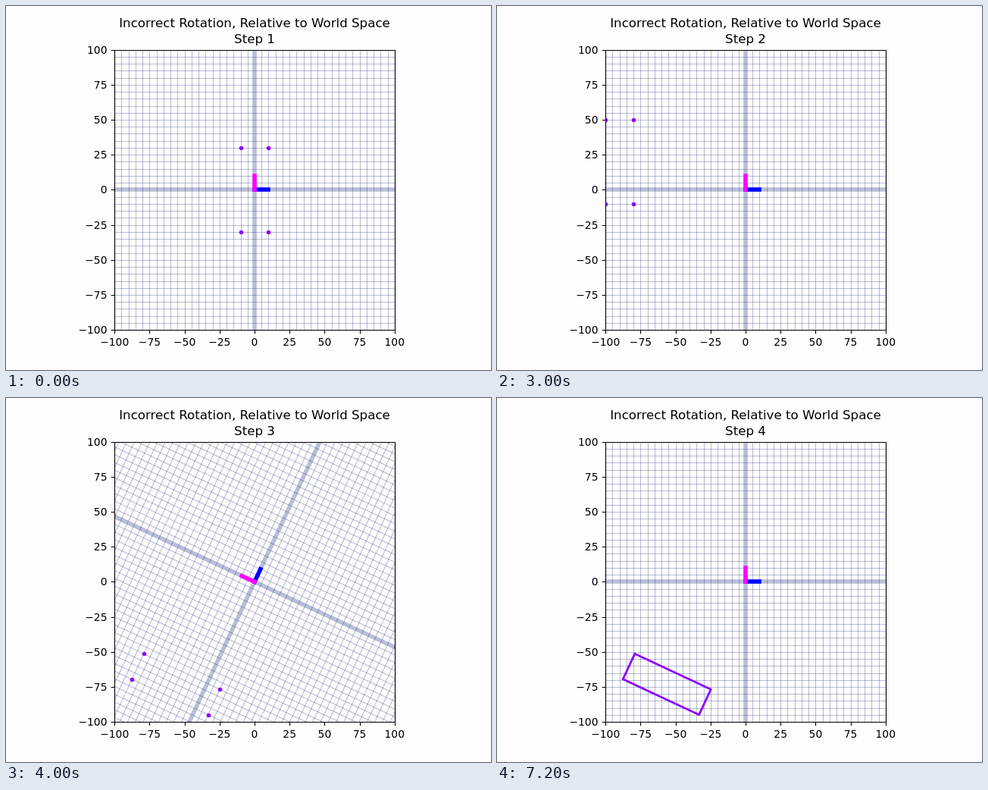
Animation of 640 by 480 pixels, one loop 8000 ms. Source, as an HTML page:

```html
<!DOCTYPE html>
<html lang="en">
<head>
<meta charset="utf-8">
<title>Rotation relative to world space</title>
<style>
  html, body { margin: 0; width: 100%; height: 100%; overflow: hidden; background: #fefefe; }
  svg { display: block; width: 100vw; height: 100vh; }
  text { font: 13.889px "DejaVu Sans", sans-serif; text-anchor: middle; }
  .title { font-size: 16.667px; }
  .ylabel { text-anchor: end; }
  path { fill: none; }
  .grid { stroke: rgb(20 40 120 / .3); stroke-width: 1.11; }
  .axis { stroke: rgb(20 40 120 / .3); stroke-width: 5.56; }
  .basis { stroke-width: 5.56; stroke-linecap: square; }
  .ticks { stroke: #000; stroke-width: 1.11; }
  .shape { stroke: #8f00ff; stroke-width: 2.78; stroke-linejoin: round; }
  circle { fill: #8f00ff; }

  .world, .brief, .step { visibility: hidden; animation: 8s step-end infinite; }
  .world { animation-name: world; }
  .brief { animation-name: brief; }
  .step { animation-name: step; }
  @keyframes world {
    0%, 37.5%, 62.5%, 100% { visibility: visible; }
    25%, 50% { visibility: hidden; }
  }
  @keyframes brief {
    0% { visibility: visible; }
    12.5%, 100% { visibility: hidden; }
  }
  @keyframes step {
    0% { visibility: visible; }
    25%, 100% { visibility: hidden; }
  }
</style>
</head>
<body>
<svg viewBox="0 0 640 480">
  <clipPath id="plot"><rect x="143" y="58" width="370" height="369"/></clipPath>
  <g id="frames" clip-path="url(#plot)"></g>
  <g id="shapes" clip-path="url(#plot)"></g>
  <path class="ticks" d="M143.5 58.5H513.5V427.5H143.5Z" stroke-linejoin="miter"/>
  <g id="labels"></g>
  <text class="title" x="328" y="28">Incorrect Rotation, Relative to World Space</text>
</svg>
<script>
const SCALE = 1.848, ANGLE = 65, SHIFT = [-90, 20], LOOP = 8;
const px = x => 328 + x * SCALE;
const py = y => 242.4 - y * SCALE;
const pixel = v => Math.round(v) + 0.5;
const same = v => v;
const add = (id, markup) =>
  document.getElementById(id).insertAdjacentHTML('beforeend', markup);
const startAt = s => `style="animation-delay:${s ? s - LOOP : 0}s"`;

// A grid with its heavy axes and two basis vectors.
function frame(cls, start, ox, oy, angle) {
  const thin = angle ? same : pixel;
  const thick = angle ? same : Math.round;
  let across = '', down = '';
  for (let k = -40; k <= 40; k++) {
    if (!k) continue;
    across += `M-200 ${thin(py(oy + k * 5))}H900`;
    down += `M${thin(px(ox + k * 5))} -300V800`;
  }
  const x = thick(px(ox)), y = thick(py(oy));
  add('frames', `<g class="${cls}" ${startAt(start)}>
    <g transform="rotate(${-angle} ${x} ${y})">
      <path class="grid" d="${across}"/><path class="grid" d="${down}"/>
      <path class="axis" d="M-200 ${y}H900"/><path class="axis" d="M${x} -300V800"/>
      <path class="basis" stroke="#00f" d="M${x} ${y}H${thick(px(ox + 10))}"/>
      <path class="basis" stroke="#f0f" d="M${x} ${y}V${thick(py(oy + 10))}"/>
    </g></g>`);
}

frame('world', 0, 0, 0, 0);
frame('brief', 2, ...SHIFT, 0);
frame('brief', 4, 0, 0, ANGLE);

const rad = ANGLE * Math.PI / 180, cos = Math.cos(rad), sin = Math.sin(rad);
const corners = [[10, 30], [-10, 30], [-10, -30], [10, -30]];
const moved = corners.map(([x, y]) => [x + SHIFT[0], y + SHIFT[1]]);
const turned = moved.map(([x, y]) => [x * cos - y * sin, x * sin + y * cos]);

const dots = points => points.map(([x, y]) =>
  `<circle cx="${pixel(px(x))}" cy="${pixel(py(y))}" r="2.78"/>`).join('');
const outline = points =>
  `<path class="shape" d="M${points.map(([x, y]) => `${px(x)} ${py(y)}`).join('L')}Z"/>`;

[dots(corners), dots(moved), dots(turned), outline(turned)].forEach((shape, i) => {
  add('shapes', `<g class="step" ${startAt(i * 2)}>${shape}</g>`);
  add('labels', `<text class="title step" ${startAt(i * 2)} x="328" y="49">Step ${i + 1}</text>`);
});

for (let v = -100; v <= 100; v += 25) {
  const x = pixel(px(v)), y = pixel(py(v));
  const label = String(v).replace('-', '\u2212');
  add('labels', `<path class="ticks" d="M${x} 427.5v4.86M143.5 ${y}h-4.86"/>
    <text x="${px(v)}" y="448">${label}</text>
    <text class="ylabel" x="133.5" y="${y + 4.5}">${label}</text>`);
}
</script>
</body>
</html>
```
